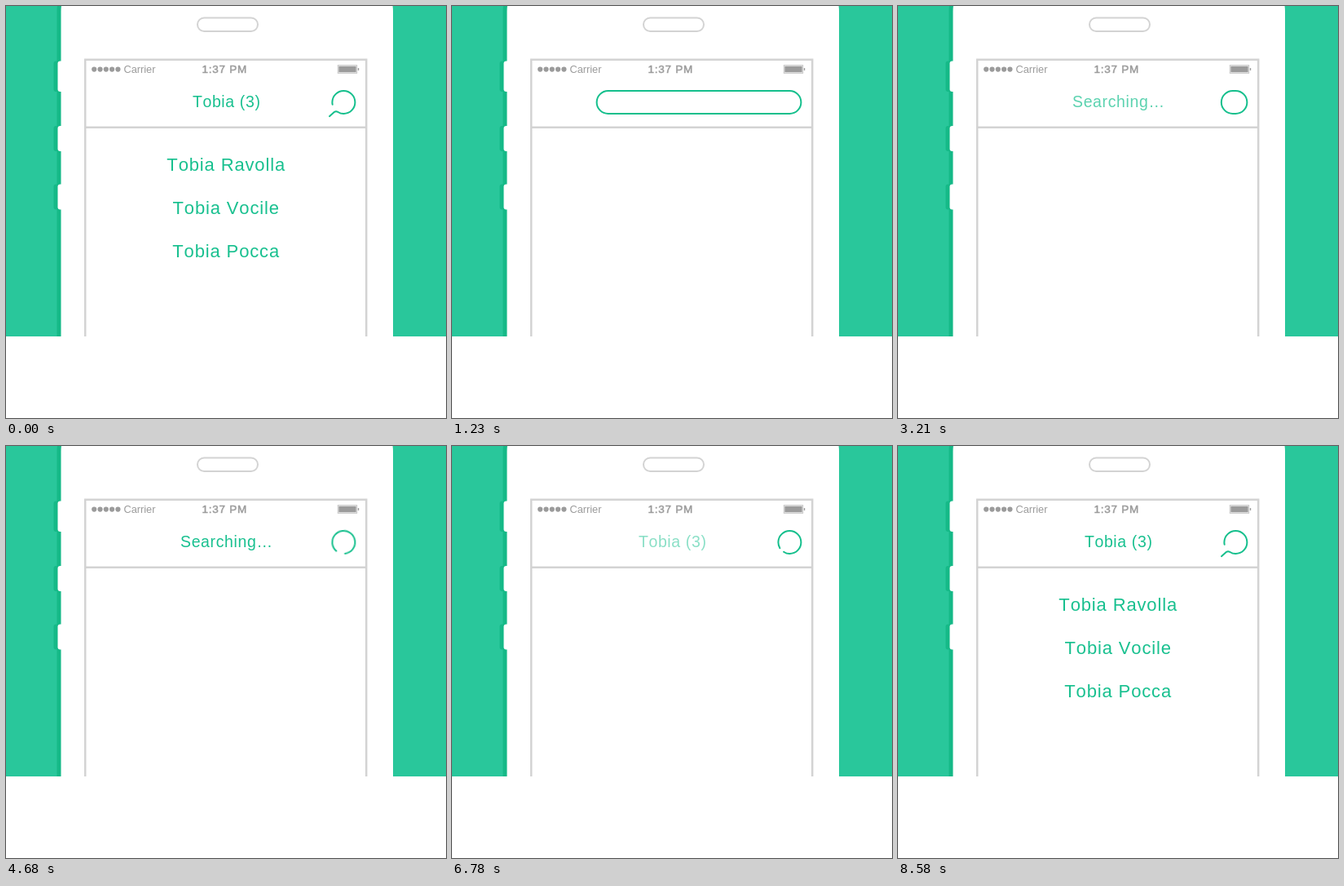
These frames come from a looping animation (540 by 505 pixels, 9.9 s). An HTML page:

```html
<!DOCTYPE html>
<html lang="en">
<head>
<meta charset="utf-8">
<title>Search interaction</title>
<style>
  :root { --green: #14bf8c; --grey: #d3d3d3; --dim: #9b9b9b; --loop: 9900ms linear infinite; }
  html, body { margin: 0; width: 100%; height: 100%; overflow: hidden; background: #fff; }
  svg { display: block; width: 100%; height: 100%; }

  text { font-family: "Liberation Sans", Arial, sans-serif; font-kerning: none; }
  .status text { font-size: 12.8px; fill: var(--dim); }
  .status .clock { font-size: 13.5px; letter-spacing: .75px; stroke: var(--dim); stroke-width: .5px; }
  .heading { font-size: 19.5px; letter-spacing: .62px; fill: #18c08f; text-anchor: middle; }
  .names text {
    font-size: 22px; letter-spacing: .86px; fill: #18c08f; text-anchor: middle;
    transform-box: fill-box; transform-origin: 50% 60%;
    animation: names var(--loop);
  }
  .outline { fill: none; stroke: var(--grey); stroke-width: 2.5px; }
  .ink { fill: none; stroke: var(--green); stroke-width: 2px; stroke-linecap: round; }

  .title { animation: title var(--loop); }
  .searching { animation: searching var(--loop); }
  .pill { animation: pill var(--loop), pill-shown var(--loop); }
  .icon { transform-origin: 414.4px 118px; animation: spin var(--loop), icon-shown var(--loop); }
  .ring { animation: ring var(--loop); }
  .tail { stroke-dasharray: 1 2; animation: tail var(--loop); }
  .lines path { animation: slide var(--loop), line-shown var(--loop); }

  @keyframes names {
    0%, 2.424% { opacity: 1; transform: none; }
    7% { opacity: 0; transform: none; animation-timing-function: step-end; }
    83.03% { opacity: 0; transform: scaleY(.08); }
    84% { opacity: 1; transform: scaleY(.3); animation-timing-function: ease-out; }
    86.667%, 100% { opacity: 1; transform: scaleY(1); }
  }
  @keyframes title {
    0%, 2.424% { opacity: 1; }
    7%, 66.667% { opacity: 0; }
    70.303%, 100% { opacity: 1; }
  }
  @keyframes searching {
    0%, 28.788% { opacity: 0; }
    33.939%, 64.848% { opacity: 1; }
    67.273%, 100% { opacity: 0; }
  }
  @keyframes pill {
    0%, 10.131% { x: 400.4px; width: 28px; animation-timing-function: cubic-bezier(.165, .84, .44, 1); }
    17.636% { x: 111px; width: 317.4px; }
    26.667% { x: 111px; width: 317.4px; animation-timing-function: cubic-bezier(.165, .84, .44, 1); }
    34.172%, 100% { x: 400.4px; width: 28px; }
  }
  @keyframes pill-shown {
    0% { opacity: 0; animation-timing-function: step-end; }
    10.131% { opacity: 1; animation-timing-function: step-end; }
    34.343%, 100% { opacity: 0; }
  }
  @keyframes icon-shown {
    0% { opacity: 1; animation-timing-function: step-end; }
    10.131% { opacity: 0; animation-timing-function: step-end; }
    34.343%, 100% { opacity: 1; }
  }
  @keyframes spin {
    0% { transform: rotate(0deg); }
    2.424% { transform: rotate(0deg); animation-timing-function: ease-in-out; }
    9.091% { transform: rotate(360deg); animation-timing-function: step-end; }
    34.343% { transform: rotate(-597.6deg); }
    67.879%, 100% { transform: rotate(0deg); }
  }
  @keyframes ring {
    0%, 7.879% { stroke-dasharray: 282 78; stroke-dashoffset: -78; }
    10.131%, 34.343% { stroke-dasharray: 360 0; stroke-dashoffset: 0; }
    36.768% { stroke-dasharray: 313 47; stroke-dashoffset: -47; }
    67.879% { stroke-dasharray: 313 47; stroke-dashoffset: -47; animation-timing-function: ease-out; }
    70.303%, 100% { stroke-dasharray: 282 78; stroke-dashoffset: -78; }
  }
  @keyframes tail {
    0%, 7.879% { stroke-dashoffset: 0; }
    10.131% { stroke-dashoffset: 1; }
    67.879% { stroke-dashoffset: 1; animation-timing-function: ease-out; }
    70.303%, 100% { stroke-dashoffset: 0; }
  }
  @keyframes slide {
    0%, 71.515% { transform: translateX(var(--from)); animation-timing-function: cubic-bezier(.215, .61, .355, 1); }
    77.273%, 100% { transform: translateX(0); }
  }
  @keyframes line-shown {
    0% { opacity: 0; animation-timing-function: step-end; }
    71.515%, 83.03% { opacity: 1; }
    84.2%, 100% { opacity: 0; }
  }
</style>
</head>
<body>
<svg viewBox="0 0 540 505">
  <defs>
    <clipPath id="stage"><rect width="540" height="405"/></clipPath>
    <clipPath id="screen"><rect x="98.4" y="150" width="342.6" height="255"/></clipPath>
    <g id="phone">
      <rect x="67.5" y="-34" width="407.5" height="500" rx="40"/>
      <rect x="63.5" y="67.5" width="12" height="37.5" rx="3"/>
      <rect x="63.5" y="147" width="12" height="31" rx="3"/>
      <rect x="63.5" y="218.5" width="12" height="31" rx="3"/>
    </g>
  </defs>

  <g clip-path="url(#stage)">
    <rect width="540" height="405" fill="#29c79b"/>
    <use href="#phone" x="-5" fill="#15b987"/>
    <use href="#phone" fill="#fff"/>
    <rect class="outline" style="stroke-width: 2px" x="235" y="14.5" width="74" height="16.5" rx="8.2"/>
    <path class="outline" d="M97.2 410V65.7H442.2V410M97.2 148.8H442.2"/>
  </g>

  <g class="status">
    <g fill="#9b9b9b">
      <circle cx="108.2" cy="77.6" r="3.1"/>
      <circle cx="115.5" cy="77.6" r="3.1"/>
      <circle cx="122.8" cy="77.6" r="3.1"/>
      <circle cx="130.1" cy="77.6" r="3.1"/>
      <circle cx="137.4" cy="77.6" r="3.1"/>
      <rect x="408.3" y="73.7" width="21.4" height="7.6"/>
      <rect x="431.8" y="76" width="1.4" height="3"/>
    </g>
    <rect x="407.3" y="72.7" width="23.4" height="9.6" fill="none" stroke="#bdbdbd" stroke-width=".9"/>
    <text x="144.4" y="82">Carrier</text>
    <text class="clock" x="240.6" y="82.3">1:37 PM</text>
  </g>

  <text class="heading title" x="270.7" y="123.8">Tobia (3)</text>
  <text class="heading searching" x="270.8" y="123.8">Searching…</text>

  <rect class="ink pill" x="400.4" y="104" width="28" height="28" rx="14"/>
  <g class="icon">
    <circle class="ink ring" cx="414.4" cy="118" r="14" pathLength="360" transform="rotate(90 414.4 118)"/>
    <path class="ink tail" pathLength="1" d="M414.4 132C411 132 409 131 407.5 130Q405 128.3 402.8 130L397 135.2"/>
  </g>

  <g class="lines" clip-path="url(#screen)">
    <path class="ink" style="--from: -244px" d="M200.5 196.4Q270 195.2 339.8 196.4"/>
    <path class="ink" style="--from: 236px" d="M208.5 249.7Q270 248.5 332.5 249.7"/>
    <path class="ink" style="--from: -236px" d="M209.5 302.9Q270 301.7 332.5 302.9"/>
  </g>

  <g class="names">
    <text x="270.2" y="202">Tobia Ravolla</text>
    <text x="270.2" y="255.2">Tobia Vocile</text>
    <text x="270.2" y="308.4">Tobia Pocca</text>
  </g>
</svg>
</body>
</html>
```
